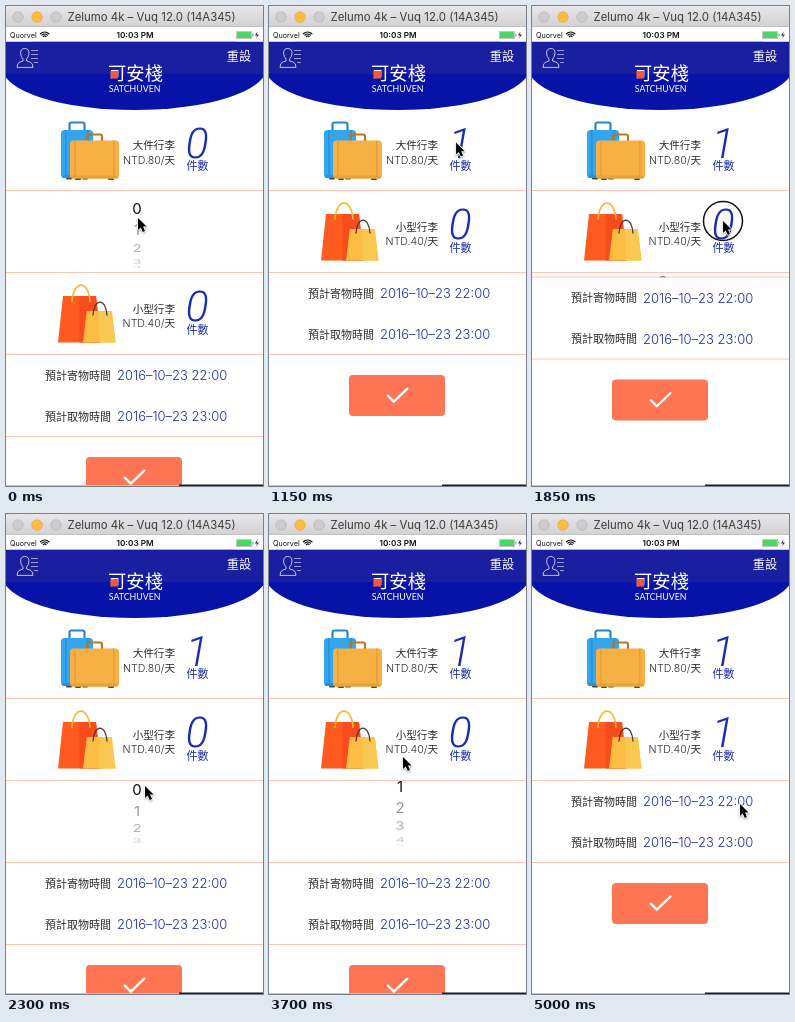
Animation of 257 by 480 pixels, one loop 5.05 s. Source, as an HTML page with a canvas:

```html
<!DOCTYPE html>
<html lang="zh-Hant">
<head>
<meta charset="utf-8">
<title>行李寄放</title>
<style>
html, body { margin: 0; width: 100%; height: 100%; overflow: hidden; background: #fff; }
canvas { display: block; width: 257px; height: 480px; }
</style>
</head>
<body>
<canvas id="stage"></canvas>
<script>
const W = 257, H = 480, LOOP = 5050, STEP = 50;
const ROW = 82, DRAG = 500;
const CJK = '"Noto Sans CJK TC", "Noto Sans CJK", sans-serif';
const UI = 'Inter, "Noto Sans CJK TC", "Noto Sans CJK", sans-serif';
const BLUE = '#1b2bb5', INK = '#2b2b2b', LINE = '#ffc4b6';

// Each round opens a wheel, drags it to 1 and picks that value
const large = { open: -600, drag: 100, pick: 900, axis: 16 };
const small = { open: 1800, drag: 2600, pick: 3950, axis: 5 };

const canvas = document.getElementById('stage');
const ctx = canvas.getContext('2d');
const ratio = window.devicePixelRatio || 1;
canvas.width = W * ratio;
canvas.height = H * ratio;

function ramp(t, from, to) {
  const u = Math.min(1, Math.max(0, (t - from) / (to - from)));
  return u * u * (3 - 2 * u);
}

const within = (t, from, length) => t >= from && t <= from + length;
const openness = (r, t) => ramp(t, r.open, r.open + 350) - ramp(t, r.pick, r.pick + 200);
const scrolled = (r, t) => ramp(t, r.drag, r.drag + DRAG) - 0.15 * (1 - ramp(t, r.open + 500, r.open + 700));
const count = (r, t) => t >= r.pick ? '1' : '0';
const pressed = (r, t) =>
  within(t, r.open, 50) || within(t, r.drag, 350) || within(t, r.pick, 50);

function pointerAt(t) {
  let x = 132, y = 212;
  const glide = (toX, toY, from, to) => {
    const e = ramp(t, from, to);
    x += (toX - x) * e;
    y += (toY - y) * e;
  };
  glide(130, 187, large.drag, large.drag + DRAG);
  glide(187, 135, 750, large.pick);
  glide(191, 215, 1100, 1700);
  glide(139, 272, small.open + 100, 2300);
  glide(134, 243, small.drag, small.drag + DRAG);
  glide(190, 214, 3700, small.pick);
  glide(208, 290, 4300, 5000);
  return [x, y];
}

function text(str, x, y, font, color, align = 'left') {
  ctx.font = font;
  ctx.fillStyle = color;
  ctx.textAlign = align;
  ctx.fillText(str, x, y);
}

function rect(x, y, w, h, color, r = 0) {
  ctx.fillStyle = color;
  ctx.beginPath();
  ctx.roundRect(x, y, w, h, r);
  ctx.fill();
}

function shape(d, color) {
  ctx.fillStyle = color;
  ctx.fill(new Path2D(d));
}

function stroke(d, color, width) {
  ctx.strokeStyle = color;
  ctx.lineWidth = width;
  ctx.lineCap = ctx.lineJoin = 'round';
  ctx.stroke(new Path2D(d));
}

function ring(x, y, r, width, color, from = 0, to = Math.PI * 2) {
  ctx.strokeStyle = color;
  ctx.lineWidth = width;
  ctx.beginPath();
  ctx.arc(x, y, r, from, to);
  ctx.stroke();
}

function divider(y) {
  rect(0, y, W, 1, LINE);
}

function titleBar() {
  const g = ctx.createLinearGradient(0, 0, 0, 21);
  g.addColorStop(0, '#e8e6e8');
  g.addColorStop(1, '#d2d0d2');
  rect(0, 0, W, 21, g);
  rect(0, 20.5, W, 0.5, '#b2b0b2');
  ['#cdcbcd', '#fdbc40', '#cdcbcd'].forEach((color, i) => {
    rect(6.5 + 19 * i, 5.5, 11, 11, color, 5.5);
    ring(12 + 19 * i, 11, 5.3, 0.5, 'rgba(0,0,0,0.15)');
  });
  text('Zelumo 4k – Vuq 12.0 (14A345)', 145.5, 15.2, '400 11.4px ' + UI, '#3c3c3c', 'center');
}

function statusBar() {
  rect(0, 21, W, 14.5, '#fff');
  text('Quorvel', 4, 31.7, '400 7.2px ' + UI, '#111');
  for (let i = 1; i <= 3; i++) {
    ring(38.7, 32, i * 2, 1.2, '#111', -Math.PI * 0.75, -Math.PI * 0.25);
  }
  text('10:03 PM', 129, 31.8, '600 8.2px ' + UI, '#111', 'center');
  rect(230, 25, 16, 8, '#8a8a8a', 1.5);
  rect(230.5, 25.5, 15, 7, '#fff', 1);
  rect(231, 26, 14, 6, '#4bd763', 0.5);
  rect(246.4, 27.5, 1, 3, '#8a8a8a');
  shape('M251.5 25.5 L249 29.5 H251 L250 32.5 L253 28.4 H251 Z', '#333');
}

function header() {
  ctx.save();
  ctx.beginPath();
  ctx.rect(0, 35.5, W, 80);
  ctx.clip();
  ctx.fillStyle = '#0713a8';
  ctx.beginPath();
  ctx.ellipse(W / 2, 62, 132, 42, 0, 0, Math.PI * 2);
  ctx.fill();
  rect(0, 35, W, 33, '#1a1f9f');
  ctx.restore();
  stroke('M11 61 Q11 57 14 56 L17 55 V53 Q14.6 50.5 14.6 47 Q14.6 42.5 18.8 42.5 Q23 42.5 23 47 Q23 50.5 20.6 53 V55 L24 56 Q27 57 27 61 Z', '#e8e9fa', 0.8);
  for (let i = 0; i < 4; i++) rect(25 + (i === 3 ? 3 : 0), 44 + 4 * i, i === 3 ? 4 : 7, 0.8, '#b9bcec');
  text('重設', 233, 54.7, '400 12.2px ' + CJK, '#fff', 'center');
  text('可安棧', 129.5, 74.3, '300 18.3px ' + CJK, '#fff', 'center');
  rect(104.5, 65, 7.5, 7.5, '#f4573f');
  text('SATCHUVEN', 128.7, 85.5, '400 8.8px Lato, sans-serif', '#fff', 'center');
}

function suitcase(x, y, w, h, grip, handle, main, shade) {
  const left = x + (w - 15) / 2;
  ctx.strokeStyle = handle;
  ctx.lineWidth = 2.2;
  ctx.beginPath();
  ctx.roundRect(left, y - grip, 15, grip + 4, 2);
  ctx.stroke();
  for (const foot of [x + 5, x + w - 11]) rect(foot, y + h - 1, 6, 2.5, '#4a4540', 1);
  rect(x, y, w, h, main, 3.5);
  for (const strap of [x + 4, x + w - 6]) rect(strap, y, 1.6, h, shade);
  rect(x + 1, y + h - 3, w - 2, 3, shade, 2);
}

function bag(x, y, top, bottom, h, main, shade) {
  const mid = x + bottom / 2, left = mid - top / 2;
  shape(`M${left} ${y} h${top} L${x + bottom} ${y + h} H${x} Z`, main);
  shape(`M${mid} ${y} H${left + top} L${x + bottom} ${y + h} H${mid} Z`, shade);
}

function loop(x, y, w, h, color, width) {
  stroke(`M${x} ${y} C${x + w * 0.1} ${y - h * 1.33} ${x + w * 0.9} ${y - h * 1.33} ${x + w} ${y}`, color, width);
}

function luggage() {
  suitcase(55, 124, 32, 48, 7.5, '#2b86c6', '#34a5ef', '#2492dc');
  suitcase(64, 134.5, 49, 38, 6, '#b3772a', '#f6b044', '#e9a038');
}

function shoppingBags() {
  bag(52, 208, 33, 43, 46.5, '#ff5a20', '#f94c1d');
  loop(66, 213, 18, 16, '#f8b93f', 1.7);
  bag(77, 223, 25, 32.5, 31.5, '#fcbd42', '#f9c851');
  loop(87, 227, 14, 13, '#4a352c', 1.3);
}

function item(top, name, price, number) {
  text(name, 169, top + 143, '300 10.6px ' + CJK, INK, 'right');
  text(price, 169, top + 157.7, '300 10.6px ' + UI, INK, 'right');
  text(number, 191, top + 151.7, 'italic 300 43px Roboto, sans-serif', BLUE, 'center');
  text('件數', 191.5, top + 164, '300 11px ' + CJK, BLUE, 'center');
}

function timeRow(y, label, value) {
  text(label, 39, y + 4, '300 11px ' + CJK, INK);
  text(value, 111, y + 4.8, '300 13px ' + UI, BLUE);
}

function wheel(top, open, axis, scroll) {
  if (open <= 0) return;
  const angle = Math.PI * 21 / 180, radius = 60;
  ctx.save();
  ctx.beginPath();
  ctx.rect(0, top, W, ROW * open);
  ctx.clip();
  for (let n = 0; n < 6; n++) {
    const a = (n - scroll) * angle;
    if (Math.abs(a) > 1.5) continue;
    const active = Math.abs(n - scroll) < 0.5;
    const depth = Math.cos(a);
    ctx.save();
    ctx.globalAlpha = active ? 1 : 0.22 + 0.45 * depth * depth;
    ctx.translate(131, top + axis + radius * Math.sin(a));
    ctx.scale(1, Math.max(depth, 0.15));
    text(String(n), 0, 5.5, '400 15px ' + UI, active ? '#111' : '#555', 'center');
    ctx.restore();
  }
  ctx.restore();
}

function button(y) {
  rect(80, y, 96, 41, '#ff7452', 4);
  stroke(`M118.8 ${y + 20.7} l6 6 l13.5 -13`, '#fff', 2.4);
}

function pointer(x, y, down) {
  if (down) ring(x, y, 19.5, 1.5, '#111');
  ctx.save();
  ctx.translate(x, y);
  const arrow = 'M0 0 V12 L2.7 9.4 L4.8 14 L7 13 L5 8.6 H8.6 Z';
  ctx.shadowColor = 'rgba(0,0,0,0.35)';
  ctx.shadowBlur = 2 * ratio;
  ctx.shadowOffsetY = ratio;
  stroke(arrow, '#fff', 1.6);
  ctx.shadowColor = 'transparent';
  shape(arrow, '#000');
  ctx.restore();
}

function draw(t) {
  const openA = openness(large, t), openB = openness(small, t);
  const shiftA = ROW * openA, shift = shiftA + ROW * openB;

  ctx.setTransform(ratio, 0, 0, ratio, 0, 0);
  rect(0, 0, W, H, '#fff');

  luggage();
  item(0, '大件行李', 'NTD.80/天', count(large, t));
  wheel(185, openA, large.axis, scrolled(large, t));
  divider(184);

  ctx.save();
  ctx.translate(0, shiftA);
  shoppingBags();
  item(ROW - 0.5, '小型行李', 'NTD.40/天', count(small, t));
  divider(184);
  wheel(267, openB, small.axis, scrolled(small, t));
  divider(266);
  ctx.restore();

  divider(266 + shift);
  timeRow(287.5 + shift, '預計寄物時間', '2016–10–23 22:00');
  timeRow(328.5 + shift, '預計取物時間', '2016–10–23 23:00');
  divider(348 + shift);
  button(369 + shift);

  header();
  statusBar();
  titleBar();
  rect(0, 479, W, 1, '#c4c4c4');
  rect(173, 478.5, W - 173, 1.5, '#1d1d1d');

  pointer(...pointerAt(t), pressed(large, t) || pressed(small, t));
}

const start = performance.now();
function tick() {
  const t = (performance.now() - start) % LOOP;
  draw(Math.floor(t / STEP) * STEP);
  requestAnimationFrame(tick);
}
tick();
</script>
</body>
</html>
```
